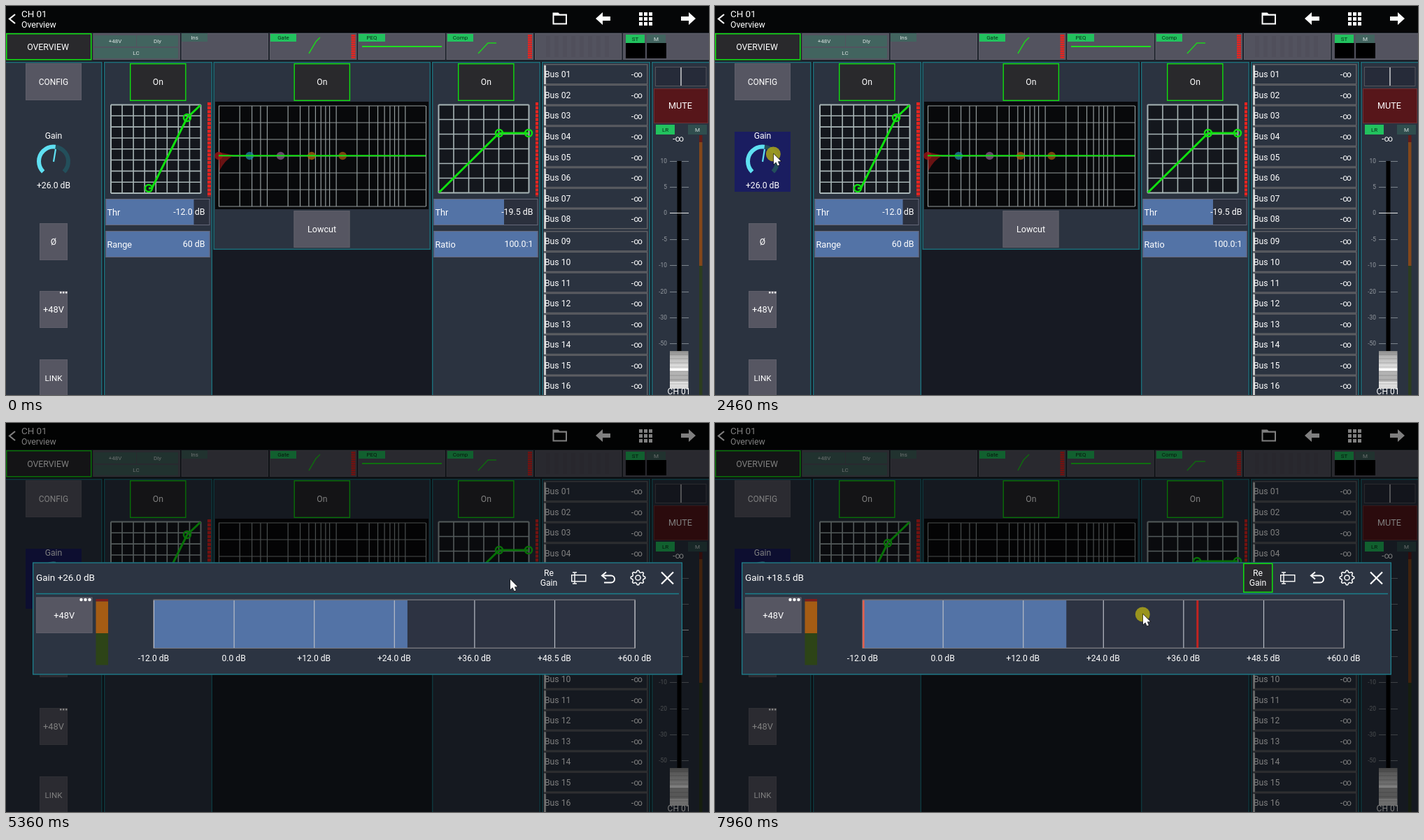
These frames come from a looping animation (1005x557 px, 8 s). An HTML page with a canvas:

```html
<!DOCTYPE html>
<html lang="en">
<head>
<meta charset="utf-8">
<title>Channel overview</title>
<style>
html, body { margin: 0; width: 100%; height: 100%; overflow: hidden; background: #161922; }
canvas { display: block; }
</style>
</head>
<body>
<canvas id="stage" width="1005" height="557"></canvas>
<script>
const g = document.getElementById('stage').getContext('2d');
const LOOP = 8000, STEP = 68.5;
const PANEL = '#2b3340', TEAL = '#1b6f7a', KEY = '#565662', GREEN = '#10e010',
  TAG = '#22c25e', DULL = '#42645f', BLUE = '#5373a6', NAVY = '#1a1d60', RED = '#e62420';

function box(x, y, x2, y2, fill, stroke, lw = 1.3) {
  if (fill) { g.fillStyle = fill; g.fillRect(x, y, x2 - x, y2 - y); }
  if (stroke) {
    g.strokeStyle = stroke; g.lineWidth = lw;
    g.strokeRect(x + lw / 2, y + lw / 2, x2 - x - lw, y2 - y - lw);
  }
}

// y is the middle of the capitals
function text(s, x, y, size = 12.2, align = 'center', color = '#fff') {
  g.font = size + 'px Roboto, sans-serif';
  g.textAlign = align; g.fillStyle = color;
  g.fillText(s, x, y + size * 0.355);
}

function line(pts, color, lw = 1) {
  g.beginPath();
  pts.forEach(([x, y]) => g.lineTo(x, y));
  g.strokeStyle = color; g.lineWidth = lw; g.stroke();
}

function dot(x, y, r, color) {
  g.beginPath(); g.arc(x, y, r, 0, 7);
  g.fillStyle = color; g.fill();
}

function ring(x, y, r, color, lw, a = 0, b = 7) {
  g.beginPath(); g.arc(x, y, r, a, b);
  g.strokeStyle = color; g.lineWidth = lw; g.stroke();
}

function button(s, x, y, x2, y2, size) {
  box(x, y, x2, y2, KEY, '#5e5e69', 1);
  text(s, (x + x2) / 2, (y + y2) / 2, size);
}

function onButton(x) {
  box(x, 82, x + 80.6, 136, '#29292c', GREEN, 1.4);
  text('On', x + 40.3, 109);
}

function tag(s, x, y, x2, y2, fill = DULL) {
  box(x, y, x2, y2, fill);
  text(s, (x + x2) / 2, (y + y2) / 2, 8, 'center', fill == TAG ? '#0b2a18' : '#dbe4e2');
}

function meter(x, y, x2, y2, pitch, gap) {
  for (; y < y2; y += pitch) box(x, y, x2, Math.min(y + pitch - gap, y2), RED);
}

function grid(x, y, x2, y2, n) {
  box(x, y, x2, y2, '#14171d');
  for (let i = 0; i <= n; i++) {
    const lw = i % n ? 1.6 : 2, u = x + (x2 - x) * i / n, v = y + (y2 - y) * i / n;
    line([[u, y], [u, y2]], '#a8b5b6', lw);
    line([[x, v], [x2, v]], '#a8b5b6', lw);
  }
}

function slider(name, value, x, y, edge) {
  box(x, y, x + 149, y + 38, '#2b303d');
  box(x, y, edge, y + 38, BLUE);
  box(x, y, x + 149, y + 38, null, '#66697a', 1);
  text(name, x + 2, y + 19, 12.7, 'left');
  text(value, x + 142, y + 19, 12.4, 'right');
}

function arrow(x, dir) {
  g.fillStyle = '#fff';
  g.beginPath();
  [[-11, 0], [-1, -9], [-1, -3], [10, -3], [10, 3], [-1, 3], [-1, 9]]
    .forEach(([u, v]) => g.lineTo(x + u * dir, 18 + v));
  g.fill();
}

function topBar(drop) {
  box(0, 0, 1005, 38, '#050607');
  line([[13, 12], [5, 18.5], [13, 25]], '#fff', 2.2);
  text('CH 01', 22, 11, 13.4, 'left');
  text('Overview', 22, 27, 12.3, 'left');
  g.beginPath();
  [[781.5, 9.5], [789.5, 9.5], [791.5, 11.5], [802, 11.5], [802, 26.5], [781.5, 26.5]]
    .forEach(p => g.lineTo(...p));
  g.closePath(); g.rect(783.5, 13.7, 16.5, 10.8);
  g.fillStyle = '#fff'; g.fill('evenodd');
  arrow(854, 1); arrow(975, -1);
  for (let i = 0; i < 9; i++) {
    const x = 905 + i % 3 * 7, y = 9 + (i / 3 | 0) * 7;
    box(x, y, x + 5, y + 5, '#fff');
  }

  box(0, 38, 1005, 80, '#1d222b');
  for (let i = 0; i < 7; i++) {
    const x = 124.5 + i * 126.3;
    box(x, 39, x + 124.2, 77, '#53535f', '#5f5f69', 1);
  }
  box(0, 39, 122.5, 77.5, '#29292c', GREEN, 1.5);
  text('OVERVIEW', 60, 59, 12.3);
  tag('+48V', 126, 42, 186, 58); tag('Dly', 187, 42, 246, 58); tag('LC', 126, 60, 246, 75);
  tag('Ins', 251, 39, 288, 51);
  tag('Gate', 378, 40, 415, 51, TAG);
  tag('PEQ', 504, 40, 542, 51, TAG);
  tag('Comp', 631, 40, 668, 51, TAG);
  const d = drop * 0.27;
  line([[433, 68], [443 - d, 51 + d], [449, 45]], '#1fd21f', 1.5);
  line([[509, 58], [623, 58]], '#1fe01f', 1.8);
  line([[675, 68], [689 - d, 53 + d], [701, 53 + d]], '#1fd21f', 1.5);
  meter(493.5, 41, 499.5, 75, 3.2, 0.7);
  meter(746, 41, 752, 75, 3.2, 0.7);
  for (let x = 772; x < 868; x += 12) box(x, 43, x + 6, 73, '#504f5b');
  tag('ST', 886, 41, 913, 53, TAG); tag('M', 916, 41, 943, 53);
  box(886, 53, 914, 75, '#000'); box(916, 53, 944, 75, '#000');
}

function leftPanel(hover) {
  button('CONFIG', 28, 82, 108, 135, 11.9);
  if (hover) box(28, 180, 108, 266, NAVY);
  text('Gain', 68, 186, 12.2);
  const turn = Math.PI * 1.5, a = Math.PI * 0.75, mid = a + turn * 38 / 72;
  ring(68, 222.5, 21, '#234f5b', 6, mid, a + turn);
  ring(68, 222.5, 21, '#5fe0f2', 6, a, mid);
  line([[71, 205], [68, 223]], '#5fe0f2', 2.2);
  text('+26.0 dB', 68, 257);
  button('Ø', 48, 311, 88, 364);
  button('+48V', 48, 408, 88, 461, 12.8);
  for (let x = 77; x < 87; x += 4) box(x, 409, x + 2.5, 411.5, '#fff');
  button('LINK', 48, 506, 88, 559, 11.6);
}

function gatePanel(drop) {
  onButton(177);
  grid(150, 141.5, 278.5, 268, 8);
  const d = drop * 1.6, top = 160 + d, low = 261 + d, x = 259 - d;
  line([[278, 142], [x, top], [x - 50.5, low], [x - 55, low]], GREEN, 3);
  ring(x, top, 5, GREEN, 2.5);
  ring(x - 55, low, 5, GREEN, 2.5);
  meter(288, 138, 293, 273, 5.6, 1.2);
  slider('Thr', '-12.0 dB', 142.5, 276, 268.5);
  slider('Range', '60 dB', 142.5, 322, 291.5);
}

function eqLine(f) {
  const x = 304.5 + 98.67 * Math.log10(f / 20);
  line([[x, 143], [x, 287]], '#939b9c', 1.2);
}

function eqPanel() {
  onButton(411.5);
  box(299, 137, 604, 291, '#08090b');
  for (let i = 0; i < 7; i++) line([[304, 143 + i * 24], [600, 143 + i * 24]], '#939b9c', 1.2);
  [20, 40, 60, 80].forEach(eqLine);
  for (let f = 100; f <= 10000; f *= 10)
    for (let k = 1; k < 9 && f * k <= 20000; k++) eqLine(f * k);
  g.globalAlpha = 0.75;
  g.fillStyle = '#8a1717';
  g.beginPath();
  g.moveTo(304, 209); g.lineTo(326, 214); g.quadraticCurveTo(313, 220, 305, 236); g.fill();
  ['#a51616', '#1f8aa3', '#8a5c8c', '#b0660f', '#a35a12']
    .forEach((c, i) => dot(304 + i * 44.3, 214.5, 5.8, c));
  g.globalAlpha = 1;
  line([[304, 214.3], [600, 214.3]], GREEN, 2);
  button('Lowcut', 411.5, 293, 491.5, 346, 12.6);
}

function compPanel(drop) {
  onButton(646);
  grid(618.5, 141.5, 747.5, 267.5, 6);
  const d = drop * 2.13;
  line([[619, 267], [705 - d, 182 + d], [747, 182 + d]], GREEN, 3);
  ring(705 - d, 182 + d, 5, GREEN, 2.5);
  ring(747, 182 + d, 5, GREEN, 2.5);
  meter(757, 138, 761, 273, 5.6, 1.2);
  slider('Thr', '-19.5 dB', 611.5, 276, 712);
  slider('Ratio', '100.0:1', 611.5, 322, 760.5);
}

function busPanel() {
  for (let i = 0; i < 16; i++) {
    const y = 98 + i * 29.57 + (i > 7 ? 2.5 : 0);
    box(769, y - 15, 917.5, y + 14.5, null, '#5f6064', 1.5);
    box(769, y - 13, 772, y + 14, '#c9c9c9');
    text('Bus ' + String(i + 1).padStart(2, '0'), 770, y, 12.2, 'left');
    text('-∞', 910, y, 12.5, 'right');
  }
}

function faderPanel() {
  box(928, 87, 1001.5, 115, '#262b39', '#54555c', 1);
  line([[965, 88], [965, 114]], '#e6e6e6', 1.3);
  box(926, 118, 1004, 168, '#57161a', '#6d3034', 1);
  text('MUTE', 964, 143, 12.6);
  tag('LR', 929, 170, 956, 184, TAG); tag('M', 975, 170, 1002, 184, '#304e4e');
  text('-∞', 961, 190, 12);
  box(991, 185, 995.5, 195, '#641c18');
  box(991, 195, 995.5, 372, '#84471a');
  box(991, 372, 995.5, 557, '#2c3d1f');
  box(959.5, 222, 965.5, 495, '#000');
  ['10', '5', '0', '-5', '-10', '-20', '-30', '-50'].forEach((s, i) => {
    const y = Math.floor(222 + i * 37.4) + 0.5, c = s == '0' ? '#e8e8e8' : '#7c848c';
    line([[949, y], [959, y]], c); line([[966, y], [976, y]], c);
    if (s == '0') line([[959, y], [966, y]], c);
    text(s, 945, y, 8.4, 'right', '#969ba1');
  });
  const cap = g.createLinearGradient(0, 494, 0, 548);
  [[0, '#8a8a8a'], [0.15, '#b8b8b8'], [0.3, '#cacaca'], [0.46, '#e8e8e8'], [0.48, '#fff'], [0.52, '#fff'],
    [0.54, '#b4b4b4'], [0.8, '#b0b0b0'], [0.83, '#e6e6e6'], [1, '#d4d4d4']].forEach(s => cap.addColorStop(...s));
  box(949, 494, 975.5, 548, cap);
  for (let y = 499; y < 546; y += 6) line([[949, y], [975, y]], 'rgba(60,60,60,.25)');
  text('CH 01', 962, 552, 12);
}

function mainScreen(hover, drop) {
  box(0, 0, 1005, 557, '#171a23');
  topBar(drop);
  [[-3, 137.5], [140, 295], [296.5, 607, 349], [609, 764], [766, 921], [923, 1009]]
    .forEach(([x, x2, y2 = 560]) => box(x, 80, x2, y2, PANEL, TEAL, 1.4));
  leftPanel(hover); gatePanel(drop); eqPanel(); compPanel(drop); busPanel(); faderPanel();
}

function popupIcons() {
  const w = '#fff';
  box(808, 217, 829.5, 227.5, null, w, 1.4);
  line([[813, 214], [813, 230]], w, 1.4);
  line([[810, 214], [816, 214]], w, 1.4); line([[810, 230], [816, 230]], w, 1.4);
  line([[858, 213.5], [852, 218.5], [858, 223.5]], w, 2);
  g.beginPath(); g.moveTo(852, 218.5); g.lineTo(865, 218.5);
  g.arc(865, 223.5, 5, -Math.PI / 2, Math.PI / 2); g.lineTo(855, 228.5);
  g.lineWidth = 2; g.stroke();
  g.beginPath();
  for (let i = 0; i < 32; i++) {
    const a = (i - 0.5) * Math.PI / 16, r = i % 4 < 2 ? 10.3 : 8;
    g.lineTo(903.5 + r * Math.cos(a), 221.5 + r * Math.sin(a));
  }
  g.closePath(); g.lineWidth = 1.5; g.stroke();
  ring(903.5, 221.5, 3.6, w, 1.5);
  line([[937, 213.5], [954, 230.5]], w, 2.2); line([[954, 213.5], [937, 230.5]], w, 2.2);
}

function popup(gain, hover, linked) {
  box(38, 199.5, 967, 360.5, '#2c3442', '#1b7f8c', 1.3);
  text('Gain +' + gain.toFixed(1) + ' dB', 43, 221.5, 13.5, 'left');
  line([[43, 244.5], [962, 244.5]], '#1b7f8c', 1.3);
  if (linked) box(755, 200.5, 797.5, 243, '#29292c', GREEN, 1.5);
  else if (hover) box(755, 200.5, 797.5, 243, NAVY);
  text('Re', 776, 215, 12.2); text('Gain', 776, 229, 12.2);
  popupIcons();

  button('+48V', 43, 249.5, 123.5, 301, 12.8);
  for (let x = 107.5; x < 122; x += 6) dot(x, 253, 2.2, '#fff');
  box(128.5, 252, 146, 255.5, '#7d1c1c');
  box(128.5, 255.5, 146, 301, '#a55c14');
  box(128.5, 301, 146, 346.5, '#2d4417');

  box(210.5, 252.5, 900, 323, '#2d3342', '#77777d', 1.4);
  box(212, 254, 211 + (gain + 12) * 9.55, 322, BLUE);
  ['-12.0', '0.0', '+12.0', '+24.0', '+36.0', '+48.5', '+60.0'].forEach((s, i) => {
    const x = 211.5 + i * 114.6;
    line([[x, 254], [x, 322]], '#b9bdc6', 1.2);
    text(s + ' dB', x - 0.5, 337, 12.1);
  });
  if (linked) {
    line([[212.3, 254], [212.3, 322]], '#e2604e', 2.6);
    line([[689.8, 254], [689.8, 322]], '#c42320', 3);
  }
}

// time, x, y of the pointer tip
const path = [
  [790, 854, 545], [1000, 560, 460], [1270, 284, 377], [1550, 168, 307], [1850, 105, 238], [2110, 84, 212],
  [3921, 84, 212], [4200, 180, 229], [4740, 494, 229], [4810, 530, 227], [5050, 633, 226],
  [5360, 721, 224], [5570, 749, 224], [5980, 772, 224], [6571, 772, 224],
  [7188, 704, 266], [7331, 704, 266], [7948, 612, 274]
];

function pointerAt(t) {
  const start = [7400, 6640, 3990, 790].find(s => s <= t);
  if (start === undefined) return null;
  const q = start + Math.floor((t - start) / STEP) * STEP;
  const i = path.findIndex(p => p[0] > q);
  if (i < 0) return path[path.length - 1].slice(1);
  const [ta, xa, ya] = path[i - 1], [tb, xb, yb] = path[i], k = (q - ta) / (tb - ta);
  return [xa + (xb - xa) * k, ya + (yb - ya) * k];
}

function pointer([x, y], pressed) {
  if (pressed) dot(x - 0.7, y, 10.5, 'rgba(174,167,24,.84)');
  g.beginPath();
  [[0, 0], [0, 14.5], [3.3, 11.4], [5.6, 16.6], [8, 15.5], [5.8, 10.5], [10.2, 10.3]]
    .forEach(([u, v]) => g.lineTo(x + u, y + v));
  g.closePath();
  g.strokeStyle = '#111'; g.lineWidth = 1.2; g.stroke();
  g.fillStyle = '#fff'; g.fill();
}

function draw(t) {
  const at = pointerAt(t), open = t >= 3320;
  const drop = t < 7400 ? 0 : Math.round((704 - at[0]) / 92 * 15) / 2;
  const overGain = at && at[0] < 108 && at[1] < 266;
  mainScreen(open || overGain, drop);
  if (open) {
    box(0, 0, 1005, 557, 'rgba(0,0,0,.5)');
    popup(26 - drop, at[0] >= 755, t >= 6180);
  }
  if (at) pointer(at, t >= 2460 && t < 3720 || t >= 7400);
}

const begin = performance.now();
function frame() {
  draw((performance.now() - begin) % LOOP);
  requestAnimationFrame(frame);
}
frame();
</script>
</body>
</html>
```
